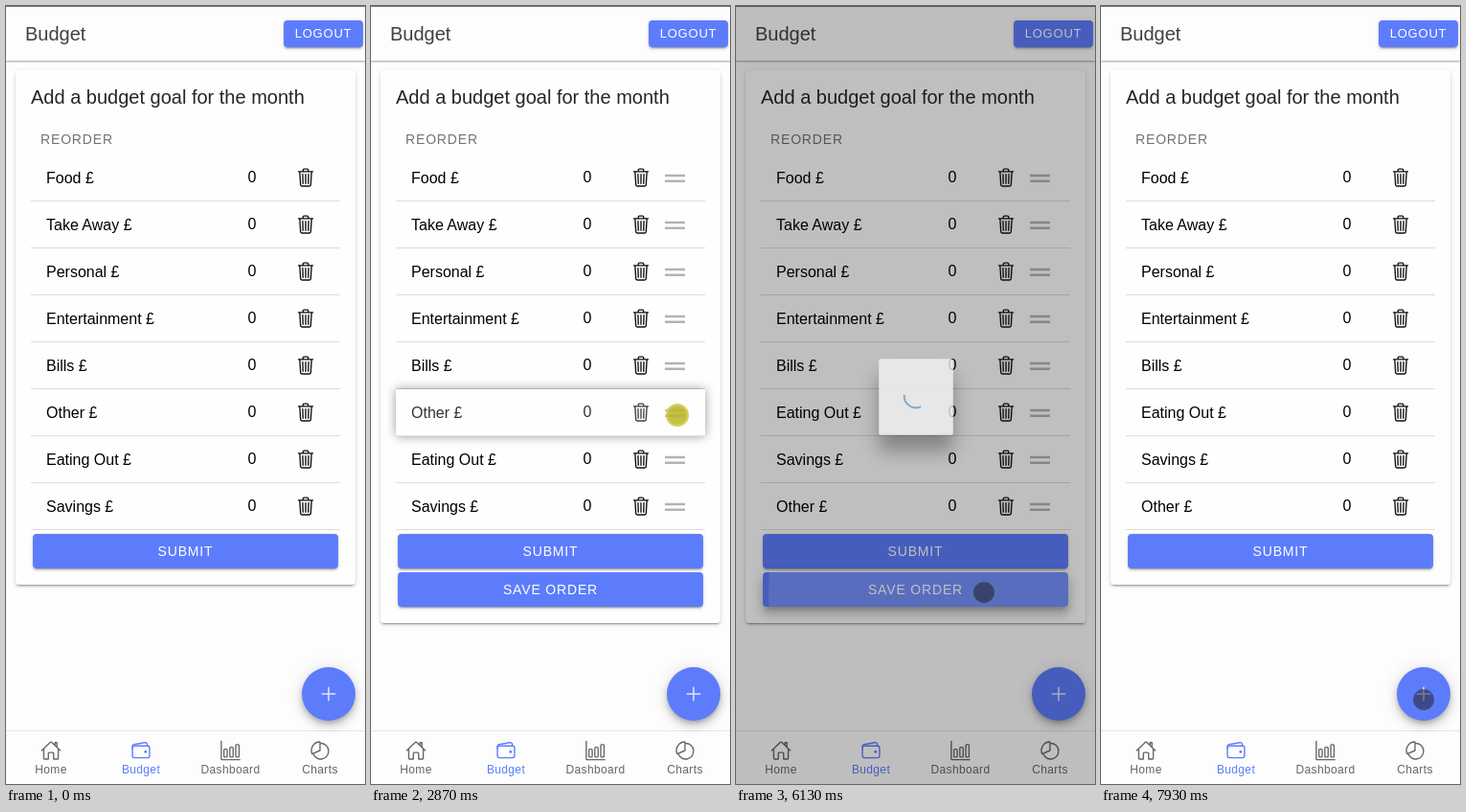
These frames come from a looping animation (375x812 px, 8000 ms). An HTML page:

```html
<!DOCTYPE html>
<html lang="en">
<head>
<meta charset="utf-8">
<title>Budget</title>
<style>
  html, body { margin: 0; width: 100%; height: 100%; overflow: hidden; background: #fdfdfd; }
  #stage { position: absolute; left: 0; top: 0; width: 375px; height: 812px; overflow: hidden;
    font-family: "Liberation Sans", Arial, sans-serif; }
  #stage div { position: absolute; box-sizing: border-box; }
  svg { position: absolute; left: 0; top: 0; overflow: visible; }
  .header { left: 0; top: 0; width: 375px; height: 57px; background: #fdfdfd;
    border-top: 1px solid #777; box-shadow: 0 1px 2px rgba(0,0,0,.38); }
  .card { left: 10px; top: 67px; width: 355px; border-radius: 4px; background: #fefefe;
    box-shadow: 0 3px 1px -2px rgba(0,0,0,.2), 0 2px 2px rgba(0,0,0,.14), 0 1px 5px rgba(0,0,0,.12); }
  .btn { background: #5d7cfc; border-radius: 4px; overflow: hidden;
    box-shadow: 0 3px 1px -2px rgba(0,0,0,.2), 0 2px 2px rgba(0,0,0,.14), 0 1px 5px rgba(0,0,0,.12); }
  .btn.down { box-shadow: 0 5px 5px -3px rgba(0,0,0,.2), 0 8px 10px 1px rgba(0,0,0,.14), 0 3px 14px 2px rgba(0,0,0,.12); }
  .btn text { fill: #fff; letter-spacing: .06em; }
  .fab { left: 309px; top: 690px; width: 56px; height: 56px; border-radius: 50%; background: #5d7cfc;
    box-shadow: 0 3px 5px -1px rgba(0,0,0,.2), 0 6px 10px rgba(0,0,0,.14), 0 1px 18px rgba(0,0,0,.12); }
  .tabs { left: 0; top: 756px; width: 375px; height: 56px; background: #fdfdfd; border-top: 1px solid #e6e6e6; }
  .tint { left: 26px; top: 123px; width: 96px; height: 32px; border-radius: 4px; overflow: hidden; }
  .ripple { border-radius: 50%; }
  .row { left: 26px; width: 323px; height: 49px; border-bottom: 1px solid #dcdcdc; }
  .row.lifted { background: #fff; opacity: .8; z-index: 2; box-shadow: 0 0 10px rgba(0,0,0,.5); }
  .shade { left: 0; top: 0; width: 375px; height: 812px; background: #000; z-index: 3; }
  .loader { left: 150px; top: 369px; width: 76px; height: 78px; border-radius: 2px; background: #f2f2f2;
    box-shadow: 0 16px 20px rgba(0,0,0,.4); z-index: 4; }
  .dot { left: -11px; top: -11px; width: 22px; height: 22px; border-radius: 50%; z-index: 5;
    background: rgba(25,25,25,.5); border: 2px solid rgba(90,90,90,.14); }
  .dot.press { left: -12px; top: -12px; width: 24px; height: 24px;
    background: rgba(184,180,30,.82); border-color: rgba(222,220,110,.55); }
</style>
</head>
<body>
<div id="stage"></div>
<script>
const LOOP = 8000, ROW = 49;
const names = ['Food', 'Take Away', 'Personal', 'Entertainment', 'Bills', 'Other', 'Eating Out', 'Savings'];
const DRAGGED = 5;

// Outline icons on a 512 grid
const icons = {
  trash: '<path d="M112 112l20 320c1 18 14 32 32 32h184c18 0 31-14 32-32l20-320M80 112h352M192 112V72a24 24 0 0124-24h80a24 24 0 0124 24v40M256 176v224M184 176l8 224M328 176l-8 224"/>',
  home: '<path d="M80 212v236a16 16 0 0016 16h96V328a24 24 0 0124-24h80a24 24 0 0124 24v136h96a16 16 0 0016-16V212M480 256L267 52c-5-5-17-5-22 0L32 256M400 179V64h-48v69"/>',
  wallet: '<rect x="48" y="144" width="416" height="288" rx="48"/><path d="M411 144v-30A50 50 0 00352 65L89 110A50 50 0 0048 159v49"/><circle cx="368" cy="288" r="18" fill="currentColor"/>',
  bars: '<path d="M32 32v432a16 16 0 0016 16h432"/><rect x="96" y="224" width="80" height="192" rx="20"/><rect x="240" y="176" width="80" height="240" rx="20"/><rect x="384" y="112" width="80" height="304" rx="20"/>',
  pie: '<path d="M256 81Q264 80 272 80a192 192 0 11-183 251M256 48A208 208 0 0066 341L256 256z"/>',
  add: '<path d="M256 112v288M400 256H112"/>'
};

const icon = (name, cx, cy, color, size = 22) =>
  `<g transform="translate(${cx - size / 2} ${cy - size / 2}) scale(${size / 512})" fill="none" color="${color}"
    stroke="${color}" stroke-width="32" stroke-linecap="round" stroke-linejoin="round">${icons[name]}</g>`;
const text = (s, x, y, size, fill, extra = '') =>
  `<text x="${x}" y="${y}" font-size="${size}" fill="${fill}" ${extra}>${s}</text>`;
const svg = inner => `<svg width="1" height="1">${inner}</svg>`;
const button = (id, label, x, y, w, h, size, base) =>
  `<div class="btn" id="${id}" style="left:${x}px;top:${y}px;width:${w}px;height:${h}px">
    <div class="ripple"></div>${svg(text(label, w / 2, base, size, '#fff', 'text-anchor="middle"'))}</div>`;

const row = name => `<div class="row">${svg(
  text(name + ' £', 16, 30, 16, '#000') +
  `<g class="side">${text('0', 231, 29, 16, '#000', 'text-anchor="middle"')}${icon('trash', 287, 24, '#111')}</g>` +
  '<path class="grip" d="M281 22h21M281 27.8h21" stroke="#b3b3b3" stroke-width="2.6"/>')}</div>`;

const tab = ([name, label, x, color]) => icon(name, x, 20, color) +
  text(label, x, 44, 12, color, 'text-anchor="middle" letter-spacing=".36"');

const stage = document.getElementById('stage');
stage.innerHTML = `
  <div class="header">${svg(text('Budget', 20, 35, 20, '#424242'))}</div>
  ${button('logout', 'LOGOUT', 290, 15, 83, 28, 13, 18)}
  <div class="card"></div>
  <div class="tint"><div class="ripple"></div></div>
  ${svg(text('Add a budget goal for the month', 26, 102, 20, '#262626') +
    text('REORDER', 36, 144, 14, '#737373', 'letter-spacing=".84"'))}
  ${button('submit', 'SUBMIT', 28, 551, 319, 36, 14, 23)}
  ${button('save', 'SAVE ORDER', 28, 591, 319, 36, 14, 23)}
  ${names.map(row).join('')}
  <div class="tabs">${svg([
    ['home', 'Home', 47, '#666'], ['wallet', 'Budget', 141, '#5d7cfc'],
    ['bars', 'Dashboard', 234.5, '#666'], ['pie', 'Charts', 328, '#666']].map(tab).join(''))}</div>
  <div class="fab">${svg(icon('add', 28, 28, '#dfe5ff', 24))}</div>
  <div class="shade"></div>
  <div class="loader">${svg('<path d="M6 -10.4A12 12 0 0 1 6 10.4" fill="none" stroke="#7ba3c4" stroke-width="2"/>')}</div>
  <div class="dot"></div>`;

const $ = s => stage.querySelector(s);
const card = $('.card'), save = $('#save'), saveRipple = $('#save .ripple'), tintRipple = $('.tint .ripple');
const shade = $('.shade'), loader = $('.loader'), arc = $('.loader path'), dot = $('.dot');
const rows = [...stage.querySelectorAll('.row')].map(el => ({
  el, side: el.querySelector('.side'), grip: el.querySelector('.grip')
}));

const between = (t, a, b) => t >= a && t < b;
const ramp = (t, a, b) => Math.min(1, Math.max(0, (t - a) / (b - a)));
const smooth = p => p * p * (3 - 2 * p);

// Pointer stops: time, x, y
const stops = [
  [290, 320, 682], [1080, 97, 141], [1420, 97, 141], [2020, 334, 511], [2640, 320, 427],
  [2880, 320, 427], [3350, 317, 562], [3570, 315, 526], [3800, 315, 526], [4260, 303, 488],
  [4650, 313, 451], [5200, 262, 622], [5470, 262, 622], [5590, 259, 612], [6690, 259, 612],
  [7060, 289, 757], [7640, 331, 808], [7930, 337, 724]
];
const presses = [[1230, 1390], [2870, 3720], [5900, 6050]];

function pointer(t) {
  let i = 0;
  while (i < stops.length - 2 && t >= stops[i + 1][0]) i++;
  const [t0, x0, y0] = stops[i], [t1, x1, y1] = stops[i + 1];
  const p = smooth(ramp(t, t0, t1));
  return { x: x0 + (x1 - x0) * p, y: y0 + (y1 - y0) * p };
}

function setRipple(el, x, y, r, color, opacity) {
  el.style.cssText = `left:${x - r}px;top:${y - r}px;width:${2 * r}px;height:${2 * r}px;background:${color};opacity:${opacity}`;
}

function draw(t) {
  const at = pointer(t);
  const editing = between(t, 1310, 6290), dragging = between(t, 2870, 3720);

  card.style.height = (editing ? 577 : 537) + 'px';
  save.style.display = editing ? '' : 'none';
  save.classList.toggle('down', t >= 5900);
  setRipple(saveRipple, 231, 21, 224 * ramp(t, 5950, 6130) + 36 * ramp(t, 6130, 6175), '#fff', .16 * ramp(t, 5950, 6025));
  setRipple(tintRipple, 71, 18, 80 * ramp(t, 1250, 1475), '#777', .14 * ramp(t, 1250, 1325) * (1 - ramp(t, 1450, 1600)));

  rows.forEach(({ el, side, grip }, i) => {
    let y = 155 + i * ROW;
    if (i === DRAGGED) {
      if (dragging) y += at.y - 427;
      else if (t >= 3720) y += 2 * ROW;
      el.classList.toggle('lifted', dragging);
    } else if (i > DRAGGED) {
      const start = i === 6 ? 2990 : 3120;
      y -= ROW * smooth(ramp(t, start, start + 300));
    }
    el.style.top = y + 'px';
    side.setAttribute('transform', `translate(${editing ? -31 : 0} 0)`);
    grip.style.display = editing ? '' : 'none';
  });

  const enter = smooth(ramp(t, 5990, 6190)), leave = smooth(ramp(t, 6300, 6500));
  const shown = enter * (1 - leave);
  shade.style.opacity = .32 * shown;
  loader.style.opacity = shown;
  loader.style.transform = `scale(${1.1 - .1 * enter - .1 * leave})`;
  arc.setAttribute('transform', `translate(38 38) rotate(${125 + (t - 6130) * .468})`);

  dot.style.display = between(t, 300, 7060) || t >= 7690 ? '' : 'none';
  dot.classList.toggle('press', presses.some(([a, b]) => between(t, a, b)));
  dot.style.transform = `translate(${at.x}px, ${at.y}px)`;
}

const start = performance.now();
function tick() {
  draw((performance.now() - start) % LOOP);
  requestAnimationFrame(tick);
}
tick();
</script>
</body>
</html>
```
